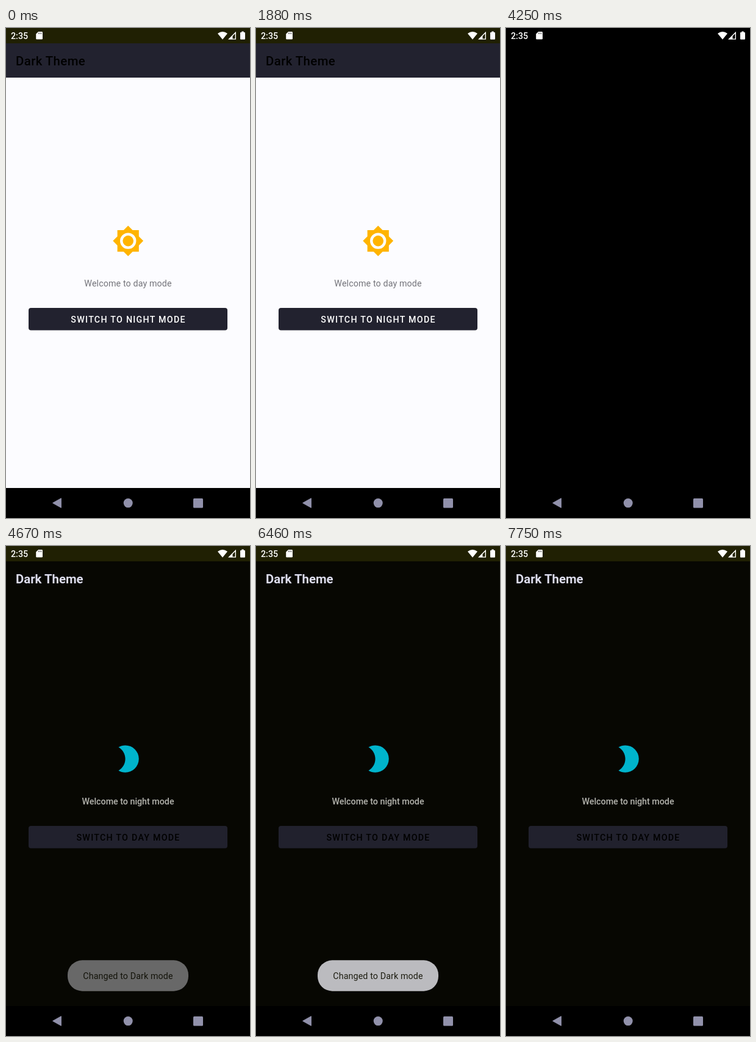
An HTML page that plays this animation: 400 px wide and 800 px high, repeating every 8000 ms.

```html
<!DOCTYPE html>
<html lang="en">
<head>
<meta charset="utf-8">
<title>Dark Theme</title>
<style>
  html, body { margin: 0; width: 100%; height: 100%; overflow: hidden; background: #000; }
  svg { display: block; width: 100%; height: 100%; font: 14.26px Roboto, sans-serif; }
  .center { text-anchor: middle; letter-spacing: .12px; }
  .medium { font-weight: 500; }
  .bold { font-weight: 700; }
  .title { font-size: 20.37px; }
  .button { letter-spacing: 1.27px; }
</style>
</head>
<body>
<svg viewBox="0 0 400 800">
  <rect width="400" height="800"/>

  <g id="day">
    <rect width="400" height="25" fill="#202003"/>
    <rect y="25" width="400" height="56" fill="#22222f"/>
    <rect y="81" width="400" height="670" fill="#fcfcff"/>
    <text class="title medium" x="16" y="61" letter-spacing=".44">Dark Theme</text>
    <g transform="translate(200.2 347.6) scale(2.2) translate(-12 -12)" fill="#ffb400">
      <path fill-rule="evenodd" d="M20 15.31L23.31 12 20 8.69V4h-4.69L12 .69 8.69 4H4v4.69L.69 12 4 15.31V20h4.69L12 23.31 15.31 20H20zM12 18a6 6 0 1 1 0-12 6 6 0 0 1 0 12z"/>
      <circle cx="12" cy="12" r="4"/>
    </g>
    <text class="center" x="200" y="422" fill="#74747a">Welcome to day mode</text>
    <rect x="37" y="457" width="326" height="36.5" rx="4" fill="#22222f"/>
    <text class="center medium button" x="200.6" y="481" fill="#fff">SWITCH TO NIGHT MODE</text>
  </g>

  <g id="night">
    <rect width="400" height="25" fill="#202003"/>
    <rect y="25" width="400" height="726" fill="#070702"/>
    <text class="title bold" x="16" y="61" fill="#dcdcec">Dark Theme</text>
    <path transform="translate(200 347.6) scale(2.22) translate(-12 -12)" fill="#00b4cc"
      d="M10 2c-1.82 0-3.53.5-5 1.35C7.99 5.08 10 8.3 10 12s-2.01 6.92-5 8.65C6.47 21.5 8.18 22 10 22a10 10 0 0 0 0-20z"/>
    <text class="medium" text-anchor="middle" x="200" y="422" fill="#b4b4ae">Welcome to night mode</text>
    <rect x="37" y="457" width="326" height="36.5" rx="4" fill="#21212d"/>
    <text class="center medium button" x="200.6" y="481">SWITCH TO DAY MODE</text>
  </g>

  <g id="toast">
    <rect x="101" y="676.3" width="198" height="50.4" rx="24" fill="#dcdce2"/>
    <text class="center" x="200" y="707" fill="#222214">Changed to Dark mode</text>
  </g>

  <!-- Status bar -->
  <g fill="#fff">
    <text class="medium" x="8" y="18">2:35</text>
    <path d="M53 6h5.6q1.4 0 1.4 1.4v9.8q0 1.4-1.4 1.4h-8q-1.4 0-1.4-1.4V9.8z"/>
    <path d="M53.5 7.5v2.4M55.7 7.5v2.4M57.9 7.5v2.4" stroke="#333" stroke-width=".9"/>
    <path d="M347 9Q355 2.8 363 9L355 18.8z"/>
    <path d="M364 18.8L377 5.8v13zM371.5 17.4h4.1V9.2l-4.1 4.1z" fill-rule="evenodd"/>
    <path d="M386.3 7V5.6h3.4V7h1.3q1 0 1 1v9.8q0 1-1 1h-6q-1 0-1-1V8q0-1 1-1z"/>
  </g>

  <!-- Navigation bar -->
  <g fill="#9191ab">
    <path d="M76.6 775.5L90.4 767.8v15.4z" stroke="#9191ab" stroke-linejoin="round"/>
    <circle cx="200.2" cy="775.6" r="7.5"/>
    <rect x="307" y="768" width="16" height="15.6" rx="1.5"/>
  </g>
</svg>
<script>
  const LOOP = 8000;
  const [day, night, toast] = ['day', 'night', 'toast'].map(id => document.getElementById(id));
  const progress = (t, start, end) => Math.min(1, Math.max(0, (t - start) / (end - start)));
  const origin = performance.now();

  function render(now) {
    const t = Math.max(0, now - origin) % LOOP;
    const toastIn = 1 - (1 - progress(t, 4540, 5040)) ** 2;
    const toastOut = progress(t, 6265, 6765) ** 2;
    day.style.opacity = 1 - progress(t, 4100, 4250);
    night.style.opacity = progress(t, 4390, 4620);
    toast.style.opacity = toastIn * (1 - toastOut);
    requestAnimationFrame(render);
  }
  render(origin);
</script>
</body>
</html>
```
